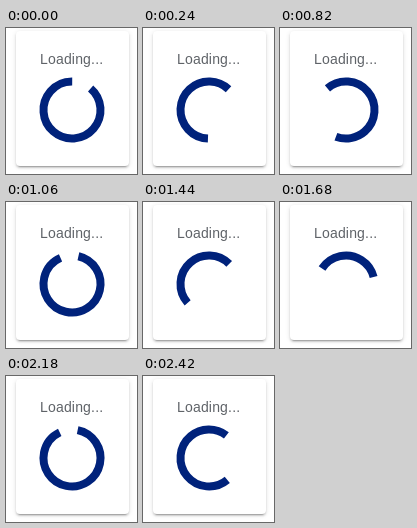
An HTML page with a canvas for the animation above (2.44 s loop, 131x146 px).

```html
<!DOCTYPE html>
<html lang="en">
<head>
<meta charset="utf-8">
<title>Loading</title>
<style>
  html, body { margin: 0; width: 100%; height: 100%; overflow: hidden; background: #fff; }
  .card {
    position: absolute; left: 10px; top: 3px; width: 113px; height: 135px;
    border-radius: 4px; background: #fff;
    box-shadow: 0 3px 1px -2px rgba(0,0,0,.2), 0 2px 2px rgba(0,0,0,.14), 0 1px 5px rgba(0,0,0,.12);
  }
  .label {
    position: absolute; left: 34px; top: 21px; white-space: nowrap;
    font: 14px/20px "Liberation Sans", Arial, sans-serif; letter-spacing: .18px; color: #5f6368;
  }
  canvas { position: absolute; left: 0; top: 0; width: 131px; height: 146px; }
</style>
</head>
<body>
<div class="card"></div>
<div class="label">Loading...</div>
<canvas></canvas>
<script>
const LOOP = 2440, STEPS = 83, STEP_OFFSET = 0.28;
const START_PHASE = 0.357, PHASE_PER_STEP = 0.02622, HEAD_LEAD = 0.375;
const CENTER = { x: 66, y: 82 }, OUTER = 32.5, WIDTH = 8;

const canvas = document.querySelector('canvas');
const ctx = canvas.getContext('2d');
const scale = window.devicePixelRatio || 1;
canvas.width = Math.round(131 * scale);
canvas.height = Math.round(146 * scale);
ctx.scale(scale, scale);

// cubic-bezier(.5, 0, .5, 1), solved by bisection
function ease(x) {
  let lo = 0, hi = 1;
  for (let i = 0; i < 24; i++) {
    const s = (lo + hi) / 2;
    if (1.5 * s - 1.5 * s * s + s * s * s < x) lo = s; else hi = s;
  }
  return lo * lo * (3 - 2 * lo);
}

// Whole turns plus the eased part of the current one
function turns(phase) {
  const whole = Math.floor(phase);
  return whole + ease(phase - whole);
}

function stepAt(ms) {
  return Math.min(STEPS - 1, Math.floor(ms * STEPS / LOOP + STEP_OFFSET));
}

function draw(ms) {
  const phase = START_PHASE + stepAt(ms) * PHASE_PER_STEP;
  const tail = (turns(phase) - 0.375) * 2 * Math.PI;
  const head = (turns(phase + HEAD_LEAD) - 0.125) * 2 * Math.PI;
  ctx.clearRect(0, 0, 131, 146);
  ctx.beginPath();
  ctx.arc(CENTER.x, CENTER.y, OUTER - WIDTH / 2, tail, head);
  ctx.lineWidth = WIDTH;
  ctx.strokeStyle = '#00227b';
  ctx.stroke();
}

const begin = performance.now();
function tick() {
  draw((performance.now() - begin) % LOOP);
  requestAnimationFrame(tick);
}
tick();
</script>
</body>
</html>
```
